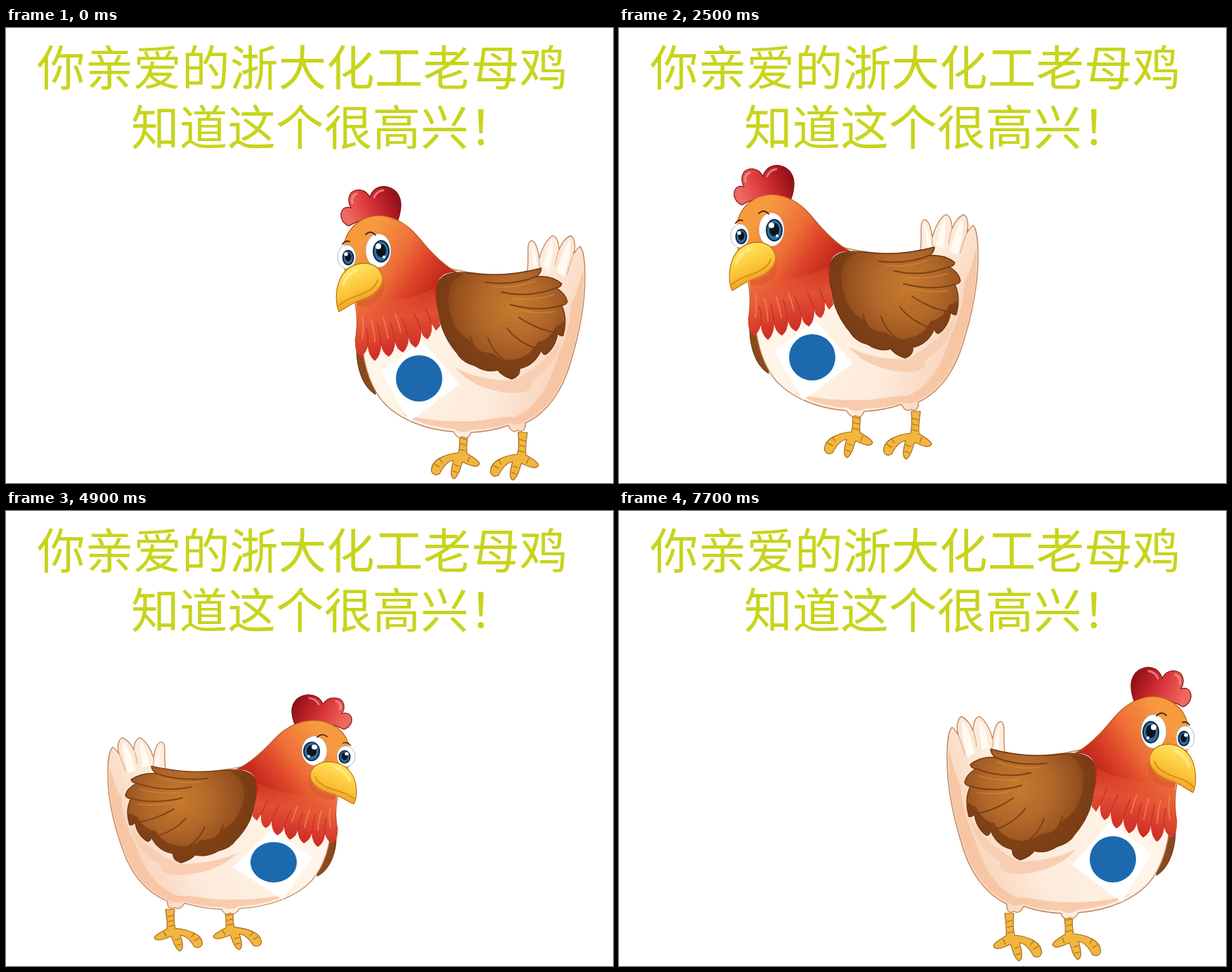
These frames come from a looping animation (864x648 px, 7.9 s). An HTML page:

```html
<!DOCTYPE html>
<html lang="zh">
<head>
<meta charset="utf-8">
<title>老母鸡</title>
<style>
  html, body { margin: 0; width: 100%; height: 100%; overflow: hidden; background: #fff; }
  svg { display: block; width: 864px; height: 648px; }
  text { font: 500 68.7px "Noto Sans CJK SC", "Noto Sans CJK", sans-serif; fill: #c8d41b; }
  .line { fill: none; stroke-linecap: round; stroke-linejoin: round; }
</style>
</head>
<body>
<svg viewBox="0 0 864 648">
  <defs>
    <linearGradient id="headFill" gradientUnits="userSpaceOnUse" x1="500" y1="320" x2="598" y2="384">
      <stop offset="0" stop-color="#f79a3e"/><stop offset=".45" stop-color="#ee7038"/>
      <stop offset=".75" stop-color="#dd4429"/><stop offset="1" stop-color="#c62a1d"/>
    </linearGradient>
    <linearGradient id="fringeFill" gradientUnits="userSpaceOnUse" x1="540" y1="365" x2="556" y2="465">
      <stop offset="0" stop-color="#ea6038" stop-opacity="0"/><stop offset=".5" stop-color="#e8593a"/>
      <stop offset="1" stop-color="#cf2b27"/>
    </linearGradient>
    <linearGradient id="combFill" gradientUnits="userSpaceOnUse" x1="486" y1="268" x2="558" y2="238">
      <stop offset="0" stop-color="#ee6a60"/><stop offset=".4" stop-color="#dc3a3c"/>
      <stop offset=".75" stop-color="#b51d25"/><stop offset="1" stop-color="#8c1118"/>
    </linearGradient>
    <linearGradient id="bodyFill" gradientUnits="userSpaceOnUse" x1="570" y1="450" x2="790" y2="545">
      <stop offset="0" stop-color="#fff5e8"/><stop offset=".6" stop-color="#fdeadb"/>
      <stop offset="1" stop-color="#f8cdb0"/>
    </linearGradient>
    <radialGradient id="wingFill" gradientUnits="userSpaceOnUse" cx="722" cy="398" r="105">
      <stop offset="0" stop-color="#c67b2c"/><stop offset=".45" stop-color="#b2682a"/>
      <stop offset=".8" stop-color="#96501f"/><stop offset="1" stop-color="#7c3d16"/>
    </radialGradient>
    <linearGradient id="beakFill" gradientUnits="userSpaceOnUse" x1="488" y1="345" x2="510" y2="392">
      <stop offset="0" stop-color="#ffe35c"/><stop offset=".6" stop-color="#fcc236"/>
      <stop offset="1" stop-color="#ee9a22"/>
    </linearGradient>
    <g id="foot" stroke="#a9671a" stroke-width="1.2" stroke-linejoin="round">
      <path fill="#f1b63e" d="M645 574 L658 574 C656 588 655 597 656 606 C664 611 672 615 674 620 C672 627 662 624 650 618
        C646 625 647 635 638 642 C631 640 634 626 637 616 C628 617 622 625 617 635 C609 639 604 633 606 626
        C608 615 624 607 644 605 C647 594 646 584 645 574Z"/>
      <path class="line" d="M647 584 L655 586 M647 592 L654 594 M646 600 L654 602 M617 613 L621 619 M610 621 L617 625 M638 622 L644 624 M636 631 L642 633 M660 611 L657 618"/>
    </g>
  </defs>

  <text x="44" y="82">你亲爱的浙大化工老母鸡</text>
  <text x="178" y="167">知道这个很高兴！</text>

  <g id="hen">
    <use href="#foot"/>
    <use href="#foot" x="84" y="2"/>

    <path fill="#8a4a1c" stroke="#5d2f10" d="M499 452 C498 480 506 510 526 522 C524 500 518 474 514 456Z"/>

    <path fill="url(#bodyFill)" stroke="#c08a64" stroke-width="1.4" d="M506 430 C506 470 516 505 533 528 C554 555 594 572 637 575
      C641 582 644 585 650 582 C655 586 660 582 662 576 C682 575 701 571 715 566 C718 573 723 577 729 573 C735 577 740 572 739 563
      C771 548 792 516 803 478 C815 440 825 395 824 350 C824 334 822 316 817 311 C812 314 811 318 808 322
      C812 309 808 296 803 296 C796 299 791 306 787 316 C787 304 783 295 777 296 C768 303 763 314 759 328
      C757 314 754 302 747 303 C740 307 745 324 742 346 C720 356 665 352 622 340Z"/>
    <path fill="#f6c09c" d="M822 345 C823 400 812 445 800 480 C788 517 768 545 739 560 C731 567 722 565 716 563
      C696 570 676 572 662 572 C652 578 644 575 638 571 C606 569 580 560 562 548 C600 562 646 560 664 560
      C690 558 706 553 724 554 C760 538 775 503 786 466 C798 440 803 420 805 392 C814 378 816 360 822 345Z" opacity=".75"/>
    <path fill="#f8cfb2" d="M640 484 C668 499 700 502 722 502 C750 488 777 466 792 440 C782 480 766 492 748 503
      C752 512 741 520 728 520 C700 521 660 510 640 484Z"/>
    <path fill="#fffaf2" d="M750 342 C751 326 748 318 748 309 C754 318 756 332 757 342Z M764 341 C768 324 770 312 777 302 C780 316 776 328 774 344Z
      M784 348 C791 325 794 310 802 302 C805 315 800 336 795 354Z"/>
    <path class="line" stroke="#e2ad8c" stroke-width="1.3" d="M759 328 Q758 336 760 341 M787 316 Q783 328 782 338 M808 322 Q802 338 799 350"/>

    <path fill="#fff" d="M533 490 L592 446 L646 507 L575 560Z"/>
    <circle cx="588" cy="499" r="33" fill="#1c69ae"/>

    <path fill="url(#wingFill)" stroke="#6b3410" stroke-width="1.4" stroke-linejoin="round" d="M613 368 C617 350 636 346 662 349
      C696 354 728 351 762 342 C762 348 759 351 755 354 C768 353 780 355 791 364 C790 368 787 370 783 370
      C793 376 798 383 799 390 C797 394 793 395 791 395 C797 408 797 424 793 438 C790 439 787 437 785 434
      C784 447 777 459 768 465 C764 465 763 462 762 458 C756 473 745 482 731 485 C732 492 728 497 720 500
      C711 497 704 493 700 487 C690 490 677 488 668 481 C656 478 647 472 642 463 C628 447 618 426 616 406 C613 394 611 381 613 368Z"/>
    <path fill="#7a3c15" d="M613 372 C618 352 636 349 650 351 C628 362 627 385 632 404 C638 428 650 440 661 445
      C668 459 680 463 692 463 C703 472 716 475 726 471 C741 470 752 457 757 447 C767 447 778 436 783 424 C787 424 790 421 794 418
      C795 426 794 432 793 438 Q788 438 785 434 C784 447 777 459 768 465 Q763 464 762 458 C756 473 745 482 731 485
      C732 492 728 497 720 500 Q707 496 700 487 C690 490 677 488 668 481 C656 478 647 472 642 463 C628 447 618 426 616 406Z" opacity=".8"/>
    <path class="line" stroke="#7b4015" stroke-width="2" d="M755 354 C730 364 704 365 682 362 M783 370 C755 381 730 382 705 376
      M791 395 C765 403 740 400 718 394 M785 434 C765 432 744 422 730 412 M762 458 C741 454 722 440 713 427
      M731 485 C708 477 692 460 686 441 M700 487 C680 474 665 457 660 438 M668 481 C650 465 640 447 637 428"/>
    <path class="line" stroke="#d29344" stroke-width="1.5" opacity=".6" d="M752 361 Q720 372 692 368 M780 380 Q748 389 722 385 M781 404 Q756 408 734 402"/>

    <path fill="url(#combFill)" stroke="#7d1216" stroke-width="1.2" d="M488 282 C478 278 474 267 479 259 C482 255 487 255 491 256
      C485 246 488 233 498 231 C507 229 514 234 518 241 C521 230 531 224 542 226 C557 229 563 242 562 255 Q561 267 556 278 Q520 263 488 282Z"/>
    <path class="line" stroke="#f5a09a" stroke-width="3" opacity=".7" d="M493 249 Q491 239 499 236 M524 241 Q528 232 537 231"/>

    <path fill="url(#headFill)" d="M482 304 C488 283 506 268 530 267 C554 268 573 281 587 298 C604 319 624 339 642 348
      C622 347 613 357 613 372 C611 390 616 408 618 424 L612 431 L606 421 Q607 437 600 443 Q592 440 591 430
      Q591 449 583 455 Q574 450 573 440 Q573 455 565 462 Q555 457 554 446 Q553 462 545 468 Q535 462 534 451
      Q533 468 525 474 Q516 467 515 453 Q512 464 505 468 Q496 462 497 446 C500 426 501 406 497 386 C484 371 476 332 482 304Z"/>
    <path fill="url(#fringeFill)" d="M498 372 C525 397 568 391 610 370 C611 390 616 408 618 424 L612 431 L606 421 Q607 437 600 443 Q592 440 591 430
      Q591 449 583 455 Q574 450 573 440 Q573 455 565 462 Q555 457 554 446 Q553 462 545 468 Q535 462 534 451
      Q533 468 525 474 Q516 467 515 453 Q512 464 505 468 Q496 462 497 446 C500 426 501 400 498 372Z" opacity=".8"/>
    <path class="line" stroke="#c23326" stroke-width="1.4" d="M515 453 Q516 440 513 427 M534 451 Q532 435 529 422 M554 446 Q551 431 547 418
      M573 440 Q569 426 563 413 M591 430 Q586 418 581 407 M606 421 Q601 409 597 399"/>
    <path class="line" stroke="#f28a58" stroke-width="2" opacity=".7" d="M507 442 Q510 424 507 410 M525 447 Q524 429 520 416 M544 442 Q541 426 537 413 M562 433 Q559 420 554 407"/>
    <path class="line" stroke="#b55a20" stroke-width="1.2" d="M482 304 C488 283 506 268 530 267 C554 268 573 281 587 298 C604 319 624 339 642 348 M497 392 Q502 420 497 446"/>

    <g stroke="#a8a8ac" stroke-width=".8" fill="#fff">
      <ellipse cx="485" cy="326" rx="13" ry="17"/>
      <ellipse cx="530" cy="317" rx="18" ry="24"/>
    </g>
    <g fill="#316f9c" stroke="#102945" stroke-width="2">
      <ellipse cx="487" cy="327" rx="7.5" ry="10"/>
      <ellipse cx="534" cy="318" rx="11" ry="15"/>
    </g>
    <ellipse cx="487" cy="326" rx="4.5" ry="6.5" fill="#0b1420"/>
    <ellipse cx="534" cy="317" rx="7" ry="9.5" fill="#0b1420"/>
    <g fill="#fff">
      <circle cx="484" cy="322" r="2.8"/><circle cx="530" cy="311" r="4"/><circle cx="538" cy="326" r="2"/>
    </g>
    <path class="line" stroke="#4e2513" stroke-width="1.8" d="M479 308 Q483 302 489 304 M512 294 Q519 287 526 295"/>

    <path fill="#d9572c" opacity=".6" d="M500 390 Q530 386 538 360 Q541 383 523 393 Q510 399 500 396Z"/>
    <path fill="url(#beakFill)" stroke="#bd7a19" stroke-width="1.3" d="M474 404 C469 394 469 375 474 361 C480 345 493 336 508 335
      C523 335 533 342 536 355 C537 371 522 382 506 387 C493 391 484 399 474 404Z"/>
    <path class="line" stroke="#c98219" stroke-width="1.4" d="M473 396 C487 382 504 383 516 374 Q526 369 529 359"/>
    <path class="line" stroke="#fff0a0" stroke-width="4" opacity=".65" d="M480 366 Q485 350 499 345"/>
  </g>
</svg>
<script>
  const LOOP = 7900, HOLD = 500, STEP = 200, TURN = 15, LAST = 37;
  const REST_FOOT = 645, CENTRE = 647.5, HALF_WIDTH = 177.5;
  // [step, left edge of the hen]
  const track = [[0, 470], [2, 432], [6, 311], [9, 212], [11, 157], [12, 118], [14, 66], [15, 44],
    [18, 77], [21, 116], [24, 158], [27, 200], [30, 254], [32, 299], [36, 394], [37, 466]];
  const hen = document.getElementById('hen');

  function leftEdge(step) {
    const i = Math.max(1, track.findIndex(([s]) => s >= step));
    const [s0, x0] = track[i - 1], [s1, x1] = track[i];
    return x0 + (x1 - x0) * (step - s0) / (s1 - s0);
  }

  // Each hop takes three steps: in the air, landing, squashed.
  function pose(step) {
    if (step === 0) return [REST_FOOT, 1];
    if (step === LAST) return [642, 1];
    const phase = (step + (step < TURN ? 1 : 0)) % 3;
    return [[615, 1], [step < 11 ? 627 : 633, 1], [627.5, 0.872]][phase];
  }

  const start = performance.now();
  function draw() {
    const t = Math.max(0, performance.now() - start) % LOOP;
    const step = t < HOLD ? 0 : 1 + Math.floor((t - HOLD) / STEP);
    const [foot, squash] = pose(step);
    const facing = step < TURN ? 1 : -1;
    hen.setAttribute('transform', `translate(${leftEdge(step) + HALF_WIDTH} ${foot}) ` +
      `scale(${facing} ${squash}) translate(${-CENTRE} ${-REST_FOOT})`);
    requestAnimationFrame(draw);
  }
  draw();
</script>
</body>
</html>
```
